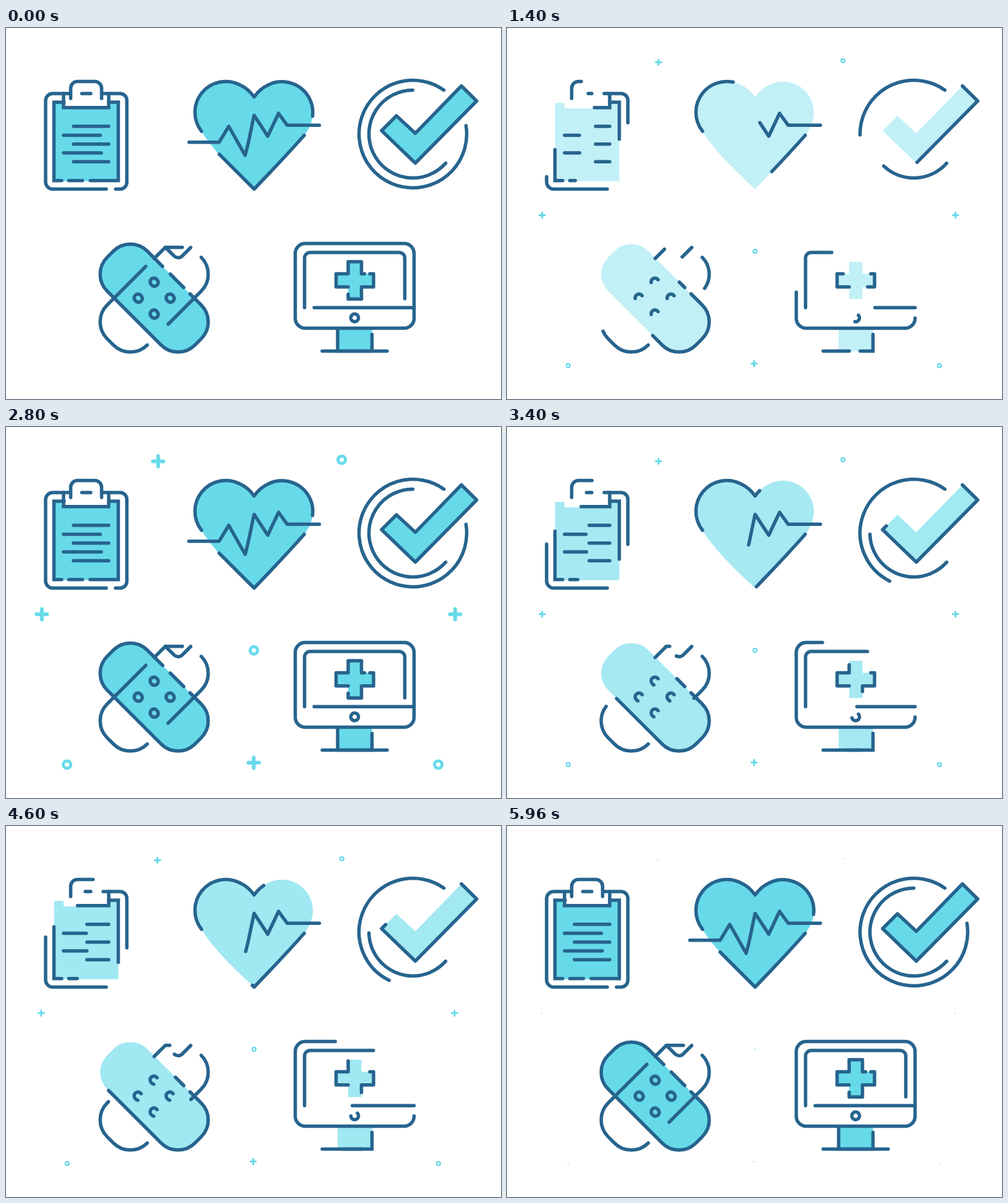
Recreate the animation shown at these times as an HTML page. Size 800 by 600 pixels, loop 6000 ms.

```html
<!DOCTYPE html>
<html lang="en">
<head>
<meta charset="utf-8">
<title>Medical icons</title>
<style>
  html, body { margin: 0; width: 100%; height: 100%; overflow: hidden; background: #fff; }
  svg { display: block; width: 800px; height: 600px; }

  .line path {
    fill: none; stroke: #27648e; stroke-width: 5.5;
    stroke-linecap: round; stroke-linejoin: round;
    stroke-dasharray: 1 2;
    animation: trace 6s linear infinite;
  }
  .line .sharp { stroke-linejoin: miter; }
  .tint { fill: #67daea; animation: trace 6s linear infinite; }
  .check .tint, .check path { animation: trace-even 3s linear infinite; }

  .spark { fill: none; stroke: #67daea; stroke-linecap: round; }
  .spark use { animation: pulse .6s linear infinite alternate; transform-origin: 0 0; }

  /* Outlines use the dash offset, filled shapes the opacity. */
  @keyframes trace {
    0%, 33.333%, 49.722%, 83.056%, 100% { stroke-dashoffset: 0; fill-opacity: 1; }
    16.667%, 66.389% { stroke-dashoffset: 1; fill-opacity: 0; }
  }
  @keyframes trace-even {
    0%, 66.667%, 100% { stroke-dashoffset: 0; fill-opacity: 1; }
    33.333% { stroke-dashoffset: 1; fill-opacity: 0; }
  }
  @keyframes pulse {
    from { transform: scale(0); }
    to { transform: scale(1); }
  }
</style>
</head>
<body>
<svg viewBox="0 0 800 600">
  <defs>
    <path id="plus" d="M-10.05 .3H15.65M2.8-12.55V13.15" stroke-width="9"/>
    <circle id="ring" cx="-.6" cy=".4" r="9" stroke-width="7.2"/>
  </defs>

  <g class="spark">
    <g transform="translate(244 55.3)"><use href="#plus"/></g>
    <g transform="translate(56 302.7)"><use href="#plus"/></g>
    <g transform="translate(724 302.7)"><use href="#plus"/></g>
    <g transform="translate(398.5 542.7)"><use href="#plus"/></g>
    <g transform="translate(543 52.7)"><use href="#ring"/></g>
    <g transform="translate(401 361)"><use href="#ring"/></g>
    <g transform="translate(99 545.7)"><use href="#ring"/></g>
    <g transform="translate(699 545.7)"><use href="#ring"/></g>
  </g>

  <!-- clipboard -->
  <path class="tint" d="M77.7 121H93V130H166V121H181.5V247.7H77.7Z"/>
  <g class="line">
    <path pathLength="1" d="M162 260.5H75.5A11.5 11.5 0 0 1 64 249V117.5A11.5 11.5 0 0 1 75.5 106H103"/>
    <path pathLength="1" d="M157 106H184.5A11 11 0 0 1 195.3 117V249.5A11 11 0 0 1 184.5 260.5H177"/>
    <path class="sharp" pathLength="1" d="M90 246.7H77.5V120H94"/>
    <path class="sharp" pathLength="1" d="M166 120H181.5V246.7H136"/>
    <path pathLength="1" d="M101.5 246.7H123.5"/>
    <path class="sharp" pathLength="1" d="M166 106V128.7H93V106"/>
    <path pathLength="1" d="M104.5 114V97.5A11 11 0 0 1 115.5 86.5H143.5A11 11 0 0 1 154.5 97.5V114"/>
    <path pathLength="1" d="M137 106H122.5"/>
    <path pathLength="1" d="M166 159H109"/>
    <path pathLength="1" d="M93 173.5H152.5"/>
    <path pathLength="1" d="M166 187.7H109"/>
    <path pathLength="1" d="M93 202H154"/>
    <path pathLength="1" d="M166 216.3H109"/>
  </g>

  <!-- heart -->
  <path class="tint" d="M316 167A49.8 49.8 0 0 1 378 92C387 96 395 103 401 111.5C407 103 415 96 424 92A49.8 49.8 0 0 1 495.5 143C494 154 489 165 482 173.5C463 195 443 216.5 423 237.5L401 260.5C381 242 336 201 316 167Z"/>
  <g class="line">
    <path pathLength="1" d="M316 167A49.8 49.8 0 0 1 378 92C387 96 395 103 401 111.5C407 103 415 96 424 92A49.8 49.8 0 0 1 495.5 143"/>
    <path pathLength="1" d="M482 173.5C463 195 443 216.5 423 237.5L401 260.5L344.5 204"/>
    <path pathLength="1" d="M506.5 157.3H454.5L440.5 138L423 175L401 141.3C396 163 393 183 386.5 206L360 159L344.5 184.7H295.5"/>
  </g>

  <!-- check mark -->
  <g class="check">
    <path class="tint" d="M607 166L631 142L661.5 170.3L736 93.7L760.7 118L661.5 218.5Z"/>
    <g class="line">
      <path pathLength="1" d="M707.7 100.4A87 87 0 1 0 743.4 157.4"/>
      <path pathLength="1" d="M710.6 218.7A71 71 0 1 1 657.5 100.5"/>
      <path pathLength="1" d="M736 93.7L760.7 118L661.5 218.5L607 166L631 142L661.5 170.3L736 93.7"/>
    </g>
  </g>

  <!-- bandage -->
  <g transform="translate(239.5 436.75) rotate(45)">
    <rect class="tint" x="-100.3" y="-45.8" width="200.6" height="91.6" rx="38.6"/>
    <g class="line">
      <path pathLength="1" d="M36.2-45.8H61.7A38.6 38.6 0 0 1 100.3-7.2V7.2A38.6 38.6 0 0 1 61.7 45.8H-61.7A38.6 38.6 0 0 1-100.3 7.2V-7.2A38.6 38.6 0 0 1-61.7-45.8H-26.3"/>
      <path pathLength="1" d="M21.7-45.8H-9"/>
    </g>
  </g>
  <g class="line" transform="translate(239.5 436.75) rotate(-45)">
    <path pathLength="1" d="M100.3 7.2A38.6 38.6 0 0 1 61.7 45.8H-14"/>
    <path pathLength="1" d="M-61.7 45.8A38.6 38.6 0 0 1-100.3 7.2V-7.2A38.6 38.6 0 0 1-61.7-45.8H26.7"/>
  </g>
  <g class="line">
    <path pathLength="1" d="M239.5 372.7L257.5 354.7H285"/>
    <path pathLength="1" d="M298.5 355L286 367.5C282 372.5 276 372.5 272 369L257.5 354.7"/>
    <path pathLength="1" d="M244.2 407.1a6.2 6.2 0 1 0-9.4 8a6.2 6.2 0 1 0 9.4-8"/>
    <path pathLength="1" d="M218.4 432.9a6.2 6.2 0 1 0-9.4 8a6.2 6.2 0 1 0 9.4-8"/>
    <path pathLength="1" d="M270 432.9a6.2 6.2 0 1 0-9.4 8a6.2 6.2 0 1 0 9.4-8"/>
    <path pathLength="1" d="M244.2 458.7a6.2 6.2 0 1 0-9.4 8a6.2 6.2 0 1 0 9.4-8"/>
  </g>

  <!-- monitor -->
  <path class="tint" d="M536 487H591.5V522.5H536Z"/>
  <path class="tint" d="M553 378H574.5V397.5H594V418.7H574.5V438.3H553V418.7H533.5V397.5H553Z"/>
  <g class="line">
    <path pathLength="1" d="M659.5 469V469.5A16 16 0 0 1 643.5 485.5H483.5A16 16 0 0 1 467.5 469.5V364.5A16 16 0 0 1 483.5 348.5H643.5A16 16 0 0 1 659.5 364.5V469"/>
    <path pathLength="1" d="M482.5 452.3V372A9 9 0 0 1 491.5 363H635.5A9 9 0 0 1 644.5 372V438"/>
    <path pathLength="1" d="M659.5 452.3H498"/>
    <path pathLength="1" d="M568 464.5a6.2 6.2 0 1 1-9 8.6a6.2 6.2 0 1 1 9-8.6"/>
    <path pathLength="1" d="M511 522.5H616"/>
    <path class="sharp" pathLength="1" d="M591.5 495.5V522.5H536V486"/>
    <path pathLength="1" d="M553 418.7H533.5V397.5H553V378H574.5V397.5H579.5"/>
    <path pathLength="1" d="M588 397.5H594V418.7H574.5V438.3H553V430.5"/>
  </g>
</svg>
</body>
</html>
```
